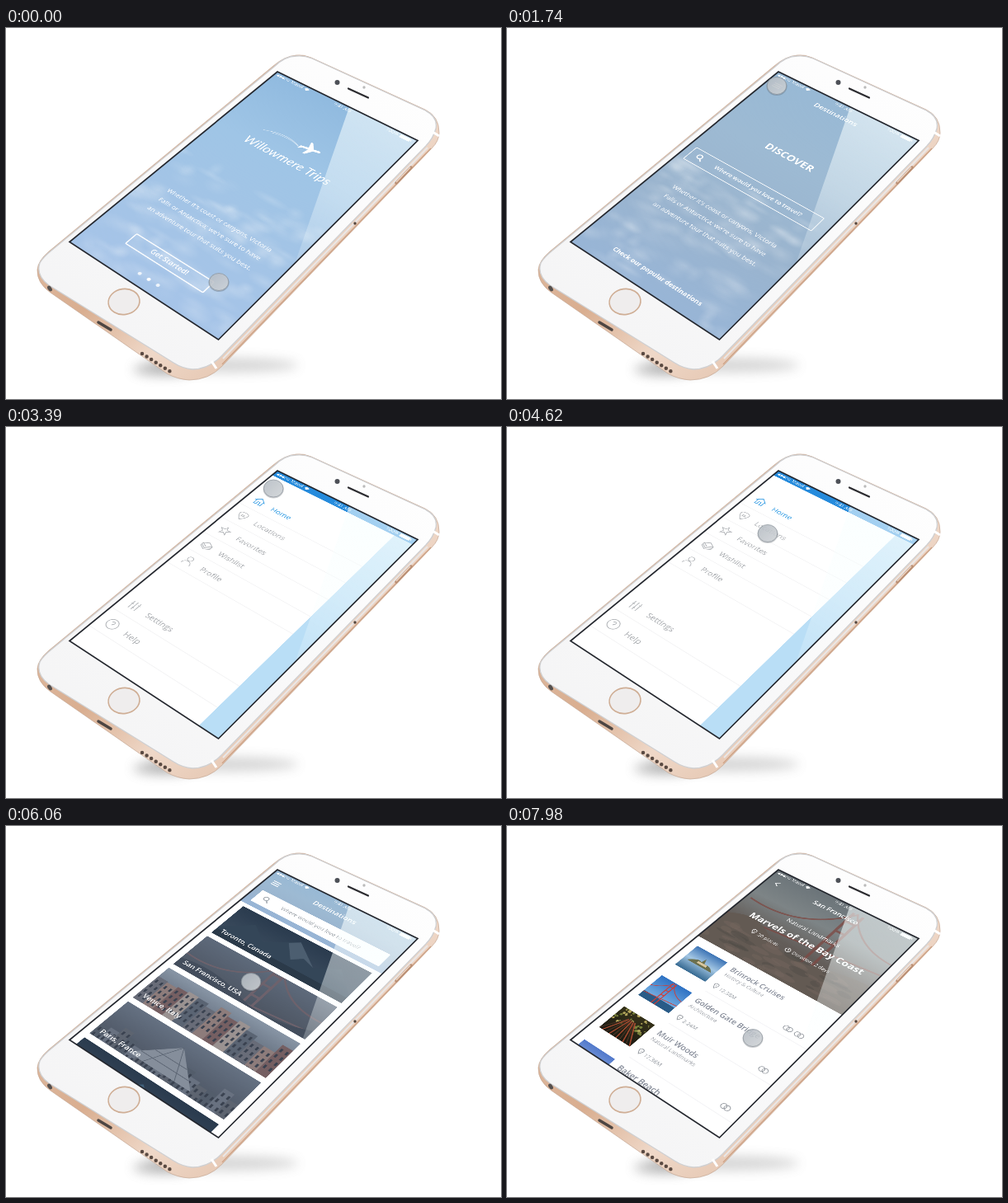
Write an HTML page that moves like this. It is 600x450 px and loops after 8000 ms.

```html
<!DOCTYPE html>
<html lang="en">
<head>
<meta charset="utf-8">
<style>
html, body { margin: 0; width: 100%; height: 100%; overflow: hidden; background: #fff; }
#stage { position: relative; width: 600px; height: 450px; overflow: hidden; }
#stage > * { position: absolute; left: 0; top: 0; }
#screen { width: 375px; height: 667px; transform-origin: 0 0; overflow: hidden; background: #fff; }
text { font-family: "Open Sans", "Noto Sans", sans-serif; }
</style>
</head>
<body>
<div id="stage">
  <svg width="600" height="450">
    <defs>
      <linearGradient id="gold" x1="0" y1="0" x2="1" y2="1">
        <stop offset="0" stop-color="#e3c9b6"/><stop offset=".45" stop-color="#d9ae90"/>
        <stop offset=".6" stop-color="#efd8c8"/><stop offset="1" stop-color="#d3a789"/>
      </linearGradient>
      <linearGradient id="front" x1="0" y1="1" x2="1" y2="0">
        <stop offset="0" stop-color="#f3f3f4"/><stop offset="1" stop-color="#fff"/>
      </linearGradient>
      <filter id="soft" x="-40%" y="-150%" width="180%" height="400%"><feGaussianBlur stdDeviation="7"/></filter>
    </defs>
    <ellipse cx="262" cy="409" rx="92" ry="9" fill="#777" opacity=".3" filter="url(#soft)"/>
    <ellipse cx="190" cy="414" rx="36" ry="8" fill="#666" opacity=".4" filter="url(#soft)"/>
    <path d="M352 33Q360 32 370 36L508 99Q525 107 525 127Q525 137 516 146L262 410Q246 427 222 427Q207 426 195 419L54 321Q37 309 38 293Q39 282 52 271L324 46Q338 34 352 33Z" fill="url(#gold)" stroke="#c4a692" stroke-width=".7"/>
    <path d="M352 34Q361 33 371 37L506 99Q524 107 521 122Q518 134 508 144L262 397Q246 414 226 414Q214 413 203 406L52 312Q36 300 41 285Q45 278 55 270L325 47Q338 34 352 34Z" fill="url(#front)" stroke="#cfd0d2" stroke-width="1.3"/>
    <path d="M511 145L263 401" stroke="#e9e7e7" stroke-width="2"/>
    <path d="M515 146L262 408" stroke="#cfa488" stroke-width="1.5"/>
    <path d="M249 404L255 413M517 126L525 131" stroke="#fff" stroke-width="3"/>
    <ellipse cx="53" cy="316" rx="2.3" ry="3.8" transform="rotate(-35 53 316)" fill="#55504e"/>
    <path d="M112 357L127 366" stroke="#4d4643" stroke-width="3.5" stroke-linecap="round"/>
    <path d="M165 395L201 418" stroke="#5a4a42" stroke-width="4.5" stroke-linecap="round" stroke-dasharray="0 6.6"/>
    <path d="M473 188L491 169" stroke="#b98e73" stroke-width="3.4" stroke-linecap="round"/>
    <path d="M473 187L490 169" stroke="#f0d8c6" stroke-width="1.2"/>
    <circle cx="423" cy="237" r="1.7" fill="#54443a"/>
    <ellipse cx="143" cy="332" rx="19" ry="15.5" transform="rotate(-8 143 332)" fill="#efeded" stroke="#cfae95" stroke-width="1.6"/>
    <circle cx="401.5" cy="66" r="3" fill="#4d5057"/>
    <circle cx="434" cy="72" r="1.7" fill="#bbb"/>
    <path d="M415 73.500L439 84.500" stroke="#2c2c30" stroke-width="2.2" stroke-linecap="round"/>
  </svg>
  <div id="screen"></div>
  <svg width="600" height="450">
    <defs>
      <linearGradient id="glare" gradientUnits="userSpaceOnUse" x1="460" y1="112" x2="352" y2="286">
        <stop offset="0" stop-color="#f8ffff" stop-opacity=".62"/>
        <stop offset=".55" stop-color="#f8ffff" stop-opacity=".4"/>
        <stop offset="1" stop-color="#f8ffff" stop-opacity=".16"/>
      </linearGradient>
      <linearGradient id="knob" x1="0" y1="0" x2="1" y2="1">
        <stop offset="0" stop-color="#b9c0c7"/><stop offset="1" stop-color="#d6d9dc"/>
      </linearGradient>
    </defs>
    <path d="M416 96L499 136.5L350 286Z" fill="url(#glare)"/>
    <path d="M329 53L499 136.5L257.500 378L77 259.500Z" fill="none" stroke="#24272e" stroke-width="1.7"/>
    <g id="cursor">
      <ellipse cy="1" rx="12.500" ry="11" fill="#3a434d" opacity=".25"/>
      <ellipse rx="11.800" ry="10.500" fill="url(#knob)" opacity=".85" stroke="#8f979f" stroke-width=".9"/>
    </g>
  </svg>
</div>
<script>
const W = 375, H = 667, LOOP = 8000;
const screen3d = document.getElementById('screen');
const cursor = document.getElementById('cursor');

// Maps the flat screen onto the phone's four screen corners.
function project([x0, y0], [x1, y1], [x2, y2], [x3, y3]) {
  const dx1 = x1 - x2, dx2 = x3 - x2, sx = x0 - x1 + x2 - x3;
  const dy1 = y1 - y2, dy2 = y3 - y2, sy = y0 - y1 + y2 - y3;
  const det = dx1 * dy2 - dx2 * dy1;
  const g = (sx * dy2 - dx2 * sy) / det, h = (dx1 * sy - sx * dy1) / det;
  return `matrix3d(${[
    (x1 - x0 + g * x1) / W, (y1 - y0 + g * y1) / W, 0, g / W,
    (x3 - x0 + h * x3) / H, (y3 - y0 + h * y3) / H, 0, h / H,
    0, 0, 1, 0, x0, y0, 0, 1].map(n => n.toFixed(9))})`;
}
screen3d.style.transform = project([329, 53], [499, 136.5], [257.5, 378], [77, 259.5]);

let seed = 11;
const rnd = (min = 0, max = 1) => {
  seed = (seed * 16807) % 2147483647;
  return min + (max - min) * seed / 2147483647;
};
const repeat = (n, fn) => Array.from({ length: n }, (_, i) => fn(i)).join('');
const rect = (x, y, w, h, fill, more = '') =>
  `<rect x="${x}" y="${y}" width="${w}" height="${h}" fill="${fill}" ${more}/>`;
const path = (d, fill, more = '') => `<path d="${d}" fill="${fill}" ${more}/>`;
const line = (d, color, width = 1.5, more = '') => path(d, 'none', `stroke="${color}" stroke-width="${width}" ${more}`);
const text = (str, x, y, size, fill = '#fff', more = '') =>
  `<text x="${x}" y="${y}" font-size="${size}" fill="${fill}" ${more}>${str}</text>`;
const mid = (str, y, size, weight = 400, x = 188) =>
  text(str, x, y, size, '#fff', `text-anchor="middle" font-weight="${weight}"`);
const gradient = (id, ...colors) => `<linearGradient id="${id}" x2="0" y2="1">${
  colors.map((c, i) => `<stop offset="${i / (colors.length - 1)}" stop-color="${c}"/>`).join('')}</linearGradient>`;
const at = (x, y, content) => `<g transform="translate(${x} ${y})">${content}</g>`;
const clip = (x, y, w, h, content) => `<svg x="${x}" y="${y}" width="${w}" height="${h}">${content}</svg>`;

const clouds = () => repeat(130, () =>
  `<ellipse cx="${rnd(0, W)}" cy="${rnd(330, 660)}" rx="${rnd(15, 50)}" ry="${rnd(9, 24)}" fill="url(#puff)" opacity="${rnd(.04, .2)}"/>`);
const status = () =>
  repeat(5, i => `<circle cx="${10 + i * 7}" cy="10" r="2.7" fill="${i < 3 ? '#fff' : 'none'}" stroke="#fff" stroke-width=".8"/>`) +
  text('Travel', 46, 14, 12) + path('M84 8q6 -5 12 0l-6 7z', '#fff') + mid('9:41 AM', 15, 12) +
  text('100%', 302, 14, 12) + rect(337, 5, 25, 10, '#fff', 'rx="2"') + rect(363, 8, 2, 4, '#fff');
const search = (x, y, color) =>
  `<circle cx="${x}" cy="${y - 2}" r="6" fill="none" stroke="${color}" stroke-width="2.5"/>` +
  line(`M${x + 4} ${y + 3}l6 6`, color, 3);
const hamburger = line('M18 36h20M18 42h20M18 48h20', '#fff', 2.4);
const pin = (x, y, color) => line(`M${x} ${y + 6}q-10 -14 0 -14q10 0 0 14zm-1 -8h2`, color, 1.5);
const blurb = y => ["Whether it's coast or canyons, Victoria", "Falls or Antarctica; we're sure to have",
  'an adventure tour that suits you best.'].map((s, i) => mid(s, y + i * 30.5, 15)).join('');
const prompt = 'Where would you love to travel?';

const defs = `<defs>
  ${gradient('sky', '#90badf', '#9fc5e6', '#a3c4e6', '#a6c4e8')}
  ${gradient('dusk', '#98b9d5', '#9dbad3', '#9ab4ce', '#98b5d6')}
  ${gradient('night', '#2a3b4e', '#3f4f61')}${gradient('haze', '#5e6a7b', '#4d5562')}
  ${gradient('town', '#8895a5', '#515a69')}${gradient('plaza', '#657182', '#4b5361')}
  ${gradient('hero', '#6b7479', '#7d8486', '#635d59', '#5d5550')}
  ${gradient('bay', '#3d74b5', '#a4c7e4', '#376a92')}${gradient('clear', '#2e72c4', '#86bce8')}
  ${gradient('wood', '#343119', '#1c1a12')}${gradient('beach', '#5279cb', '#a9c3ed')}
  <radialGradient id="puff"><stop offset="0" stop-color="#fff"/><stop offset="1" stop-color="#fff" stop-opacity="0"/></radialGradient>
</defs>`;

const home = () => rect(0, 0, W, H, 'url(#sky)') + clouds() + status() +
  line('M96 177q50 -24 90 -6M116 173q40 -12 70 -1', '#fff', 1.2, 'opacity=".7"') +
  at(211, 164, path('M-22 2L-5 -2L-10 -19L-5 -19L7 -4L20 -7Q28 -4 21 -1L9 2L-1 19L-6 19L-3 4L-16 6L-22 12L-24 12Z', '#fff')) +
  text('Willowmere Trips', 192, 231, 31, '#fff', 'text-anchor="middle" style="font-family:Lato,sans-serif;font-style:italic"') +
  blurb(446) + rect(88, 570, 196, 32, 'none', 'stroke="#fff" stroke-width="2.5" rx="2"') +
  mid('Get Started!', 590, 16, 600, 186) +
  repeat(3, i => `<circle cx="${161 + i * 23}" cy="641" r="3.8" fill="#fff" opacity="${i == 1 ? 1 : .8}"/>`);

const discover = () => rect(0, 0, W, H, 'url(#dusk)') + clouds() + status() + hamburger +
  mid('Destinations', 47, 18.5, 600) + mid('DISCOVER', 221, 25, 700, 190) +
  rect(18, 310, 331, 43, 'none', 'stroke="#fff" stroke-width="2" rx="2" opacity=".85"') +
  search(42, 330, '#fff') + text(prompt, 86, 336, 14.5, '#fff', 'font-weight="600"') +
  blurb(433) + mid('Check our popular destinations', 631, 14.2, 700);

const menuIcons = {
  Home: [111, 'M-13 0L0 -11L13 0M-9 -3V11H-3V2H3V11H9V-3'],
  Locations: [172, 'M0 13Q-22 -12 0 -12Q22 -12 0 13ZM-3 -3h6v4h-6z'],
  Favorites: [233, 'M0 -12L3 -4L12 -4L5 2L8 11L0 6L-8 11L-5 2L-12 -4L-3 -4Z'],
  Wishlist: [293, 'M-12 -3L0 -10L12 -3L0 4ZM-12 2L0 9L12 2M-12 6L0 13L12 6M-12 -3V6M12 -3V6'],
  Profile: [352, 'M0 -12a6 6 0 0 1 0 13a6 6 0 0 1 0 -13M-11 13Q-9 2 0 2Q9 2 11 13'],
  Settings: [519, 'M-8 -11V11M0 -11V11M8 -11V11M-11 -3h6M-3 5h6M5 -5h6'],
  Help: [583, 'M0 -13a13 13 0 0 1 0 26a13 13 0 0 1 0 -26M-4 -4q4 -6 7 0q0 3 -3 5v2']
};
const menu = () => rect(0, 0, W, H, '#fff') + rect(329, 20, 46, H, '#b9def6') + rect(0, 0, W, 20, '#268bdc') + status() +
  Object.entries(menuIcons).map(([name, [y, d]], i) =>
    at(35, y, line(d, i ? '#b0b3b7' : '#369de4', 1.7)) +
    text(name, 70, y + 9, 18.5, i ? '#a6a9ad' : '#2797e2') +
    line(`M0 ${y + 31}H329`, '#ececee', 1.2)).join('');

const bridge = color =>
  line('M-200 -5Q-70 15 0 -95Q70 20 220 -30M-220 60L230 10', color, 4) +
  line('M-9 90V-95M13 90V-95M-9 -65H13M-9 -30H13M-9 8H13', color, 6);
const peaks = (base, dark, light) =>
  path(`M0 ${base}L60 32L105 65L170 16L235 63L284 30L340 ${base}V120H0Z`, dark) +
  path('M150 33L170 16L235 63L204 53L183 72Z', light, 'opacity=".3"');
const houses = (n, top, tones) => repeat(n, i => {
  const x = i * 340 / n, y = top + rnd(-15, 15);
  return rect(x, y, 340 / n + 1, 120, tones[i % tones.length]) +
    repeat(8, k => rect(x + 4 + k % 2 * 13, y + 9 + (k >> 1) * 17, 5, 9, '#3a4250'));
});
const cards = [
  ['Toronto, Canada', () => rect(0, 0, 340, 110, 'url(#night)') + peaks(85, '#344658', '#8495a6') + rect(0, 91, 340, 20, '#2b3a49')],
  ['San Francisco, USA', () => rect(0, 0, 340, 110, 'url(#haze)') + at(190, 70, bridge('#6d626c')) + path('M0 85Q80 65 160 95T340 82V120H0Z', '#444e5d')],
  ['Venice, Italy', () => rect(0, 0, 340, 110, 'url(#town)') + houses(13, 34, ['#686c78', '#8d7c7b', '#755f62', '#9a9291', '#5a6473'])],
  ['Paris, France', () => rect(0, 0, 340, 110, 'url(#plaza)') + houses(15, 65, ['#535d6b', '#687180', '#5d6470']) + path('M90 99L170 24L250 99Z', '#858e9b') + line('M130 62H210M110 81H230M170 24L210 99M170 24L130 99', '#596371', 1.5)],
  ['', () => rect(0, 0, 340, 110, 'url(#night)') + peaks(35, '#34546f', '#607e96')]
];
const list = () => rect(0, 0, W, H, '#fff') + rect(0, 0, W, 137, 'url(#dusk)') + status() + hamburger +
  mid('Destinations', 47, 18.5, 600) + rect(18, 78, 339, 45, '#fff', 'rx="2"') +
  search(43, 99, '#a5acb3') + text(prompt, 88, 106, 14, '#969da4') +
  cards.map(([name, photo], i) => {
    const y = 148 + i * 124;
    return clip(18, y, 339, 110, photo()) + text(name, 31, y + 97, 17, '#fff', 'font-weight="600"');
  }).join('');

const places = [
  ['Brinrock Cruises', 'History &amp; Culture', '12.38M', 2, () => rect(0, 0, 82, 72, 'url(#bay)') + path('M10 45Q28 26 39 33L42 20L48 34Q65 30 74 45Z', '#6c704e') + rect(32, 34, 24, 6, '#d8c59c')],
  ['Golden Gate Bridge', 'Architecture', '2.24M', 1, () => rect(0, 0, 82, 72, 'url(#clear)') + rect(0, 54, 82, 20, '#295b87') + at(38, 39, `<g transform="scale(.38)">${bridge('#d43c32')}</g>`)],
  ['Muir Woods', 'Natural Landmarks', '17.38M', 1, () => rect(0, 0, 82, 72, 'url(#wood)') + repeat(38, () => `<circle cx="${rnd(0, 82)}" cy="${rnd(0, 38)}" r="${rnd(1, 4)}" fill="${rnd() > .5 ? '#77813a' : '#b3a55b'}"/>`) + repeat(10, i => line(`M${i * 9} 72L${30 + i * 2} 20`, i % 2 ? '#a84a30' : '#453022', 2.5))],
  ['Baker Beach', 'Natural Landmarks', '4.15M', 0, () => rect(0, 0, 82, 72, 'url(#beach)')]
];
const linkIcon = (x, y) => repeat(2, i => `<circle cx="${x - 4 + i * 8}" cy="${y}" r="6" fill="none" stroke="#92979e" stroke-width="1.5"/>`);
const detail = () => rect(0, 0, W, H, '#fff') +
  clip(0, 0, W, 285, rect(0, 0, W, 285, 'url(#hero)') +
    at(231, 122, `<g opacity=".75" transform="scale(1.1)">${bridge('#7e4943')}</g>`) +
    path('M0 189Q55 146 115 188T245 208T375 184V290H0Z', '#635a53') +
    repeat(45, () => `<ellipse cx="${rnd(0, W)}" cy="${rnd(209, 281)}" rx="${rnd(9, 32)}" ry="${rnd(3, 10)}" fill="${rnd() > .5 ? '#4d4945' : '#756760'}" opacity=".4"/>`)) +
  status() + line('M33 35L24 42L33 49', '#fff', 2.2) +
  mid('San Francisco', 47, 18, 600) + mid('Natural Landmarks', 130, 15.5) +
  mid('Marvels of the Bay Coast', 168, 24, 700, 193) +
  pin(86, 201, '#fff') + text('30 places', 98, 206, 12.5) +
  '<circle cx="178" cy="201" r="6" fill="none" stroke="#fff" stroke-width="1.5"/>' + line('M178 197v4h3', '#fff') +
  text('Duration: 2 days', 190, 206, 12.5) +
  places.map(([name, kind, count, links, photo], i) => {
    const y = 310 + i * 113;
    return clip(20, y, 82, 72, photo()) + text(name, 120, y + 16, 17.5, '#858b98', 'font-weight="600"') +
      text(kind, 120, y + 34, 12.5, '#9da1a8') + pin(127, y + 69, '#8d9299') + text(count, 138, y + 74, 12.5, '#989da4') +
      repeat(links, k => linkIcon(340 - k * 27, y + 71)) +
      line(`M120 ${y + 92}H${W}`, '#ececef', 1.2);
  }).join('');

screen3d.innerHTML = `<svg width="${W}" height="${H}" style="display:block">${defs}${
  [home, discover, menu, list, detail].map(page =>
    `<g class="page">${page()}${rect(0, 0, W, H, '#123a70', 'class="shade"')}</g>`).join('')}</svg>`;
const pages = [...document.querySelectorAll('.page')];
const shades = [...document.querySelectorAll('.shade')];

const clamp = x => Math.max(0, Math.min(1, x));
const easeInOut = p => p < .5 ? 4 * p ** 3 : 1 - 4 * (1 - p) ** 3;
const pushes = [[60, 715], [1900, 715], [4950, 715], [6090, 420]]; // start, duration
const cursorPath = [ // time, x, y
  [0, 258, 308], [300, 258, 308], [850, 205, 289], [1000, 205, 289], [1600, 327, 70], [3300, 327, 70],
  [4130, 243, 206], [4600, 316, 129], [4950, 316, 129], [5600, 297, 189], [6200, 297, 189],
  [6700, 293, 188], [7200, 293, 188], [7950, 298, 257], [8000, 298, 257]
];

function draw(t) {
  const position = pushes.reduce((sum, [start, span]) => sum + easeInOut(clamp((t - start) / span)), 0);
  pages.forEach((page, i) => {
    const offset = i - position;
    page.setAttribute('transform', `translate(${offset * W} 0)`);
    page.style.display = Math.abs(offset) < 1 ? '' : 'none';
    shades[i].setAttribute('opacity', .22 * clamp(-offset));
  });
  const next = cursorPath.findIndex(([time]) => time > t);
  const [t0, x0, y0] = cursorPath[next - 1], [t1, x1, y1] = cursorPath[next];
  const p = (t - t0) / (t1 - t0), k = p * p * (3 - 2 * p);
  cursor.setAttribute('transform', `translate(${x0 + (x1 - x0) * k} ${y0 + (y1 - y0) * k})`);
}
function tick() {
  draw(performance.now() % LOOP);
  requestAnimationFrame(tick);
}
tick();
</script>
</body>
</html>
```
